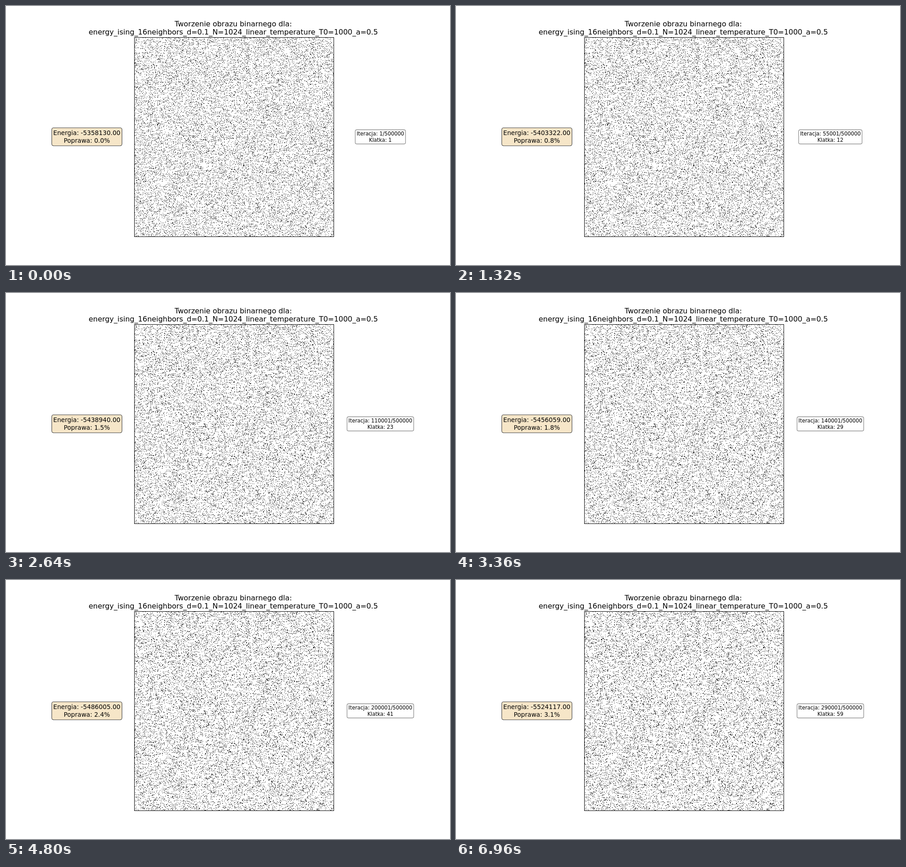
An HTML page with a canvas for the animation above (7.08 s loop, 980 by 572 pixels).

```html
<!DOCTYPE html>
<html lang="pl">
<head>
<meta charset="utf-8">
<title>Tworzenie obrazu binarnego</title>
<style>
  html, body { margin: 0; width: 100%; height: 100%; overflow: hidden; background: #fff; }
  canvas { display: block; }
</style>
</head>
<body>
<canvas id="stage" width="980" height="572"></canvas>
<script>
const ctx = document.getElementById('stage').getContext('2d');
const STEP = 120, COUNT = 59;
const N = 1024, MASK = N * N - 1;
const SIZE = 440, LEFT = 283, TOP = 69;

// Energy magnitude at a few steps: [step, value]
const knots = [[0, 5358130], [4, 5375484], [11, 5403322], [22, 5438940],
               [34, 5471785], [46, 5499231], [58, 5524117]];

const slope = (a, b) => (knots[b][1] - knots[a][1]) / (knots[b][0] - knots[a][0]);
const tangent = i => slope(Math.max(i - 1, 0), Math.min(i + 1, knots.length - 1));

// Cubic Hermite curve through the knots
function energyAt(k) {
  let i = 0;
  while (i < knots.length - 2 && k > knots[i + 1][0]) i++;
  const [x0, y0] = knots[i], [x1, y1] = knots[i + 1];
  const h = x1 - x0, u = (k - x0) / h, v = 1 - u;
  return Math.round(v * v * (1 + 2 * u) * y0 + u * u * (3 - 2 * u) * y1 +
    h * u * v * (v * tangent(i) - u * tangent(i + 1)));
}

function makeRandom(seed) {
  return () => {
    seed = (seed + 0x6D2B79F5) | 0;
    let t = Math.imul(seed ^ (seed >>> 15), seed | 1);
    t ^= t + Math.imul(t ^ (t >>> 7), t | 61);
    return ((t ^ (t >>> 14)) >>> 0) / 4294967296;
  };
}

const random = makeRandom(1024);
const grid = new Uint8Array(N * N);
const dots = [];
for (let i = 0; i < grid.length; i++) {
  if (random() < 0.1) { grid[i] = 1; dots.push(i); }
}

// Sixteen neighbours: eight directions at distances one and two
const offsets = [];
for (const r of [1, 2])
  for (let dy = -r; dy <= r; dy += r)
    for (let dx = -r; dx <= r; dx += r)
      if (dx || dy) offsets.push(dy * N + dx);

function neighbours(i) {
  let sum = 0;
  for (const o of offsets) sum += grid[(i + o) & MASK];
  return sum;
}

// Tries to move a random dot to a random empty cell; returns the energy gained
function trySwap() {
  const d = Math.floor(random() * dots.length);
  const from = dots[d], to = Math.floor(random() * N * N);
  if (grid[to]) return 0;
  grid[from] = 0;
  const gain = 4 * (neighbours(to) - neighbours(from));
  if (gain <= 0) { grid[from] = 1; return 0; }
  grid[to] = 1;
  dots[d] = to;
  return gain;
}

const sample = p => Math.floor((p + 0.5) * N / SIZE);

function snapshot() {
  const image = new ImageData(SIZE, SIZE);
  const pixels = new Uint32Array(image.data.buffer);
  for (let y = 0, p = 0; y < SIZE; y++) {
    const row = sample(y) * N;
    for (let x = 0; x < SIZE; x++) pixels[p++] = grid[row + sample(x)] ? 0xff000000 : 0xffffffff;
  }
  return image;
}

const frames = [];
for (let k = 0, gained = 0; k < COUNT; k++) {
  const goal = energyAt(k) - energyAt(0);
  while (gained < goal) gained += trySwap();
  frames.push(snapshot());
}

function write(lines, x, baselines, size) {
  ctx.font = `${size}px "DejaVu Sans", sans-serif`;
  ctx.textAlign = 'center';
  ctx.fillStyle = '#000';
  lines.forEach((line, i) => ctx.fillText(line, x, baselines[i]));
}

function box(cx, y, w, h, r, fill, edge) {
  ctx.beginPath();
  ctx.roundRect(cx - w / 2, y, w, h, r);
  ctx.fillStyle = fill;
  ctx.fill();
  ctx.strokeStyle = edge;
  ctx.lineWidth = 1.14;
  ctx.stroke();
}

function draw(k) {
  ctx.fillStyle = '#fff';
  ctx.fillRect(0, 0, 980, 572);
  ctx.putImageData(frames[k], LEFT, TOP);
  ctx.strokeStyle = '#000';
  ctx.lineWidth = 1;
  ctx.strokeRect(LEFT + 0.5, TOP + 0.5, SIZE, SIZE);

  write(['Tworzenie obrazu binarnego dla:',
    'energy_ising_16neighbors_d=0.1_N=1024_linear_temperature_T0=1000_a=0.5'],
    501.7, [45, 63], 15.94);

  const energy = energyAt(k), start = energyAt(0);
  box(178.5, 269, 155, 39.7, 4.1, '#f6e6c8', '#404040');
  write([`Energia: -${energy.toFixed(2)}`,
    `Poprawa: ${((energy / start - 1) * 100).toFixed(1)}%`], 178.4, [285, 302], 13.67);

  const progress = `Iteracja: ${k * 5000 + 1}/500000`;
  ctx.font = '11.39px "DejaVu Sans", sans-serif';
  box(826.3, 273.4, ctx.measureText(progress).width + 6.2, 31.2, 3.4, '#fff', '#808080');
  write([progress, `Klatka: ${k + 1}`], 826.3, [286, 300], 11.39);
}

let shown = -1;
function tick() {
  const k = Math.floor(performance.now() / STEP) % COUNT;
  if (k !== shown) draw(shown = k);
  requestAnimationFrame(tick);
}
tick();
</script>
</body>
</html>
```
